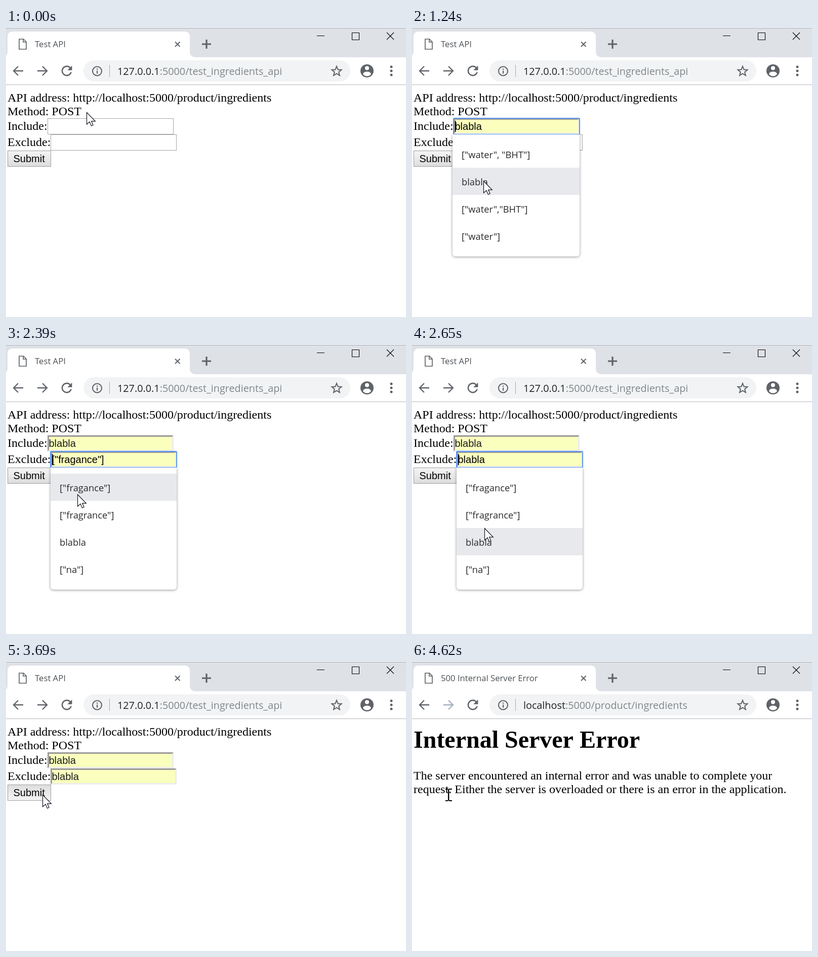
Animation of 790x573 px, one loop 5.03 s. Source, as an HTML page with a canvas:

```html
<!DOCTYPE html>
<html lang="en">
<head>
<meta charset="utf-8">
<title>Form test</title>
<style>
  html, body { margin: 0; width: 100%; height: 100%; overflow: hidden; background: #fff; }
  canvas { display: block; }
</style>
</head>
<body>
<canvas id="stage" width="790" height="573"></canvas>
<script>
const ctx = document.getElementById('stage').getContext('2d');
const LOOP = 5030;
const UI = '"Open Sans", "Noto Sans", sans-serif';
const SERIF = '"Liberation Serif", "Times New Roman", serif';
const SANS = '"Liberation Sans", Arial, sans-serif';
const GRAY = '#5f6368';
const HOST = 'localhost:5000';
const PATH = '/product/ingredients';
const RELOAD = new Path2D('M17.65 6.35C16.2 4.9 14.21 4 12 4a8 8 0 1 0 7.73 10h-2.08A6 6 0 1 1 12 6c1.66 0 3.14.69 4.22 1.78L13 11h7V4z');
const ARROW = new Path2D('M.5 .5V24L6 19L9.5 27L13 25.5L9.7 17.8H17.3Z');

// Form events, in ms
const PRESS = 3690, RELEASE = 3830, ERROR_PAGE = 3990, ERROR_BEAM = 4470;
const fields = [
  { x: 82, y: 179, menuX: 80, menuW: 251, focus: 460, open: 540, pick: 1390, blur: 2020,
    items: ['["water", "BHT"]', 'blabla', '["water","BHT"]', '["water"]'] },
  { x: 88, y: 211, menuX: 88, menuW: 249, focus: 2020, open: 2020, pick: 3150, blur: PRESS,
    items: ['["fragance"]', '["fragrance"]', 'blabla', '["na"]'] }
];
const FIELD_W = 249, FIELD_H = 32, ROW_H = 54, MENU_H = 242;

// Pointer moves: first step, last step, number of steps, destination
const moves = [
  [150, 620, 7, 139, 215],
  [840, 910, 2, 138, 257],
  [990, 1240, 4, 141, 303],
  [1390, 1860, 7, 143, 207],
  [1930, 1930, 1, 143, 215],
  [2160, 2390, 4, 141, 296],
  [2490, 2650, 3, 143, 363],
  [2720, 2920, 3, 153, 379],
  [3150, 3610, 7, 72, 263]
];

function pointerAt(t) {
  let x = 159, y = 167;
  for (const [start, end, steps, toX, toY] of moves) {
    if (t < start) break;
    const step = t >= end ? steps : 1 + Math.floor((t - start) / (end - start) * (steps - 1));
    x += (toX - x) * step / steps;
    y += (toY - y) * step / steps;
  }
  return { x: Math.round(x), y: Math.round(y) };
}

function text(str, x, y, size, family, color = '#000', weight = 400) {
  ctx.font = `${weight} ${size}px ${family}`;
  ctx.fillStyle = color;
  ctx.fillText(str, x, y);
  return ctx.measureText(str).width;
}

function rect(x, y, w, h, color) {
  ctx.fillStyle = color;
  ctx.fillRect(x, y, w, h);
}

function fill(path, color) {
  ctx.fillStyle = color;
  ctx.fill(typeof path === 'string' ? new Path2D(path) : path);
}

function stroke(path, color, width) {
  ctx.strokeStyle = color;
  ctx.lineWidth = width;
  ctx.stroke(typeof path === 'string' ? new Path2D(path) : path);
}

function disc(x, y, r, color, lineWidth) {
  const path = new Path2D();
  path.arc(x, y, r, 0, Math.PI * 2);
  lineWidth ? stroke(path, color, lineWidth) : fill(path, color);
}

function star(cx, cy, outer, inner) {
  const path = new Path2D();
  for (let i = 0; i < 10; i++) {
    const r = i % 2 ? inner : outer, a = i * Math.PI / 5 - Math.PI / 2;
    path.lineTo(cx + r * Math.cos(a), cy + r * Math.sin(a));
  }
  path.closePath();
  stroke(path, GRAY, 2);
}

function drawBrowser(error) {
  rect(0, 0, 790, 58, '#dee1e6');
  rect(0, 0, 790, 1, '#b0b3b8');
  fill('M-9 58Q3 58 3 46V18Q3 7 14 7H352Q363 7 363 18V46Q363 58 375 58Z', '#fff');
  stroke('M26 22H34.5L40 27.5V42H26ZM34 22V28H40', GRAY, 1.7);
  text(error ? '500 Internal Server Error' : 'Test API', 57, 38, 16.7, UI, '#4c5055');
  stroke('M334 27.5L343.5 37M343.5 27.5L334 37', GRAY, 2);
  stroke('M387 32H405M396 23V41', GRAY, 3.2);
  stroke('M614 15.5H629M683.5 9.5H697.5V23.5H683.5ZM752 9L766 23M766 9L752 23', '#000', 1.1);

  stroke('M24 76L15 85L24 94M15 85H34', GRAY, 2.3);
  stroke('M72 76L81 85L72 94M81 85H62', error ? '#a3b0c0' : GRAY, 2.3);
  ctx.save();
  ctx.translate(104.4, 69.4);
  ctx.scale(1.3, 1.3);
  fill(RELOAD, GRAY);
  ctx.restore();

  const pill = new Path2D();
  pill.roundRect(153, 64, 527, 42, 21);
  fill(pill, '#f1f3f4');
  disc(180, 85.5, 9, GRAY, 2.1);
  rect(179, 84.5, 2.2, 6, GRAY);
  rect(179, 80.5, 2.2, 2.2, GRAY);
  rect(204, 73, 1, 24, '#a5a8ac');
  const [host, rest] = error ? ['localhost', ':5000' + PATH] : ['127.0.0.1', ':5000/test_ingredients_api'];
  const width = text(host, 220, 93, 19.8, UI, '#202124');
  text(rest, 220 + width, 93, 19.8, UI, '#80868b');
  star(653, 86, 10, 4.4);

  disc(713, 85, 13, GRAY);
  disc(713, 79.5, 4, '#fff');
  fill('M705 91.5Q706 86.5 713 86.5T721 91.5Q718 95.5 713 95.5T705 91.5Z', '#fff');
  for (const y of [77, 85, 93]) disc(761, y, 2.5, GRAY);
  rect(0, 112, 790, 1, '#b4b6b9');
}

function drawSquiggle(x, y, width) {
  const path = new Path2D();
  for (let i = 0; i <= width; i += 2.5) path.lineTo(x + i, y + (i / 2.5 % 2 ? 0 : 2.4));
  stroke(path, '#e8392f', 1.3);
}

function drawField(field, t, hovered) {
  const { x, y, items } = field;
  const focused = t >= field.focus && t < field.blur;
  const picked = t >= field.pick;
  const value = picked ? 'blabla' : items[hovered] || '';
  rect(x, y, FIELD_W, FIELD_H, value ? '#faffbd' : '#fff');
  if (value) {
    fill(`M${x} ${y}h${FIELD_W}l-3 3H${x + 3}V${y + 29}l-3 3Z`, '#9a9a9a');
    fill(`M${x + FIELD_W} ${y}v${FIELD_H}H${x}l3-3H${x + 246}V${y + 3}Z`, '#ececec');
  } else {
    ctx.strokeStyle = '#a5a5a5';
    ctx.lineWidth = 1;
    ctx.strokeRect(x + .5, y + .5, FIELD_W - 1, FIELD_H - 1);
  }
  if (focused) {
    const ring = new Path2D();
    ring.roundRect(x, y, FIELD_W, FIELD_H, 1.5);
    stroke(ring, '#5c96ee', 2);
  }
  const width = text(value, x + 2.5, y + 23, 20, SANS, picked ? '#1c1c1c' : '#000');
  if (focused && picked) drawSquiggle(x + 3, y + 25, width);
  if (focused && !picked) rect(x + 3, y + 5, 1.6, 22, '#000');
}

function drawMenu({ menuX, menuW, y, items }, hovered) {
  const top = y + FIELD_H;
  const panel = new Path2D();
  panel.roundRect(menuX, top, menuW, MENU_H, [0, 0, 6, 6]);
  ctx.save();
  ctx.beginPath();
  ctx.rect(0, top, 790, 573);
  ctx.clip();
  ctx.shadowColor = 'rgba(0,0,0,.42)';
  ctx.shadowBlur = 5;
  ctx.shadowOffsetY = 1;
  fill(panel, '#fff');
  ctx.restore();
  items.forEach((item, i) => {
    const rowY = top + 12 + i * ROW_H;
    if (i === hovered) rect(menuX, rowY, menuW, ROW_H, '#e8e9ec');
    text(item, menuX + 18, rowY + 35, 18.3, UI, '#292a2d');
  });
}

function drawForm(t, pointer) {
  text(`API address: http://${HOST}${PATH}`, 3, 146, 24, SERIF);
  text('Method: POST', 3, 173, 24, SERIF);
  text('Include:', 3, 202, 24, SERIF);
  text('Exclude:', 3, 234, 24, SERIF);

  const pressed = t >= PRESS && t < RELEASE;
  const shade = ctx.createLinearGradient(0, 243, 0, 275);
  shade.addColorStop(0, pressed ? '#dddddd' : '#f5f5f5');
  shade.addColorStop(1, pressed ? '#f5f5f5' : '#dcdcdc');
  rect(3, 243, 86, 32, '#9c9c9c');
  rect(4, 244, 84, 30, shade);
  text('Submit', 14.5, 266, 20, SANS);

  const active = fields.find(f => t >= f.open && t < f.pick);
  const hovered = active ? Math.floor((pointer.y - active.y - FIELD_H - 12) / ROW_H) : -1;
  for (const field of fields) drawField(field, t, field === active ? hovered : -1);
  if (active) drawMenu(active, hovered);

  const menuTop = active ? active.y + FIELD_H : Infinity;
  return pointer.y < menuTop && fields.some(f =>
    pointer.x >= f.x && pointer.x < f.x + FIELD_W && pointer.y >= f.y && pointer.y < f.y + FIELD_H);
}

function drawError() {
  text('Internal Server Error', 3, 170, 48, SERIF, '#000', 700);
  text('The server encountered an internal error and was unable to complete your', 3, 233, 24, SERIF);
  text('request. Either the server is overloaded or there is an error in the application.', 3, 260, 24, SERIF);
}

function drawPointer({ x, y }, beam) {
  ctx.save();
  ctx.translate(x, y);
  if (beam) {
    rect(-6, -12, 5, 2, '#000');
    rect(1, -12, 6, 2, '#000');
    rect(-6, 11, 5, 2, '#000');
    rect(1, 11, 6, 2, '#000');
    rect(-1, -11, 2.4, 23, '#000');
  } else {
    fill(ARROW, '#fff');
    stroke(ARROW, '#10101c', 1.2);
  }
  ctx.restore();
}

function draw(t) {
  const error = t >= ERROR_PAGE;
  const pointer = pointerAt(t);
  rect(0, 0, 790, 573, '#fff');
  drawBrowser(error);
  let beam = t >= ERROR_BEAM;
  if (error) drawError();
  else beam = drawForm(t, pointer);
  drawPointer(pointer, beam);
}

const start = performance.now();
function tick() {
  draw((performance.now() - start) % LOOP);
  requestAnimationFrame(tick);
}
tick();
</script>
</body>
</html>
```
